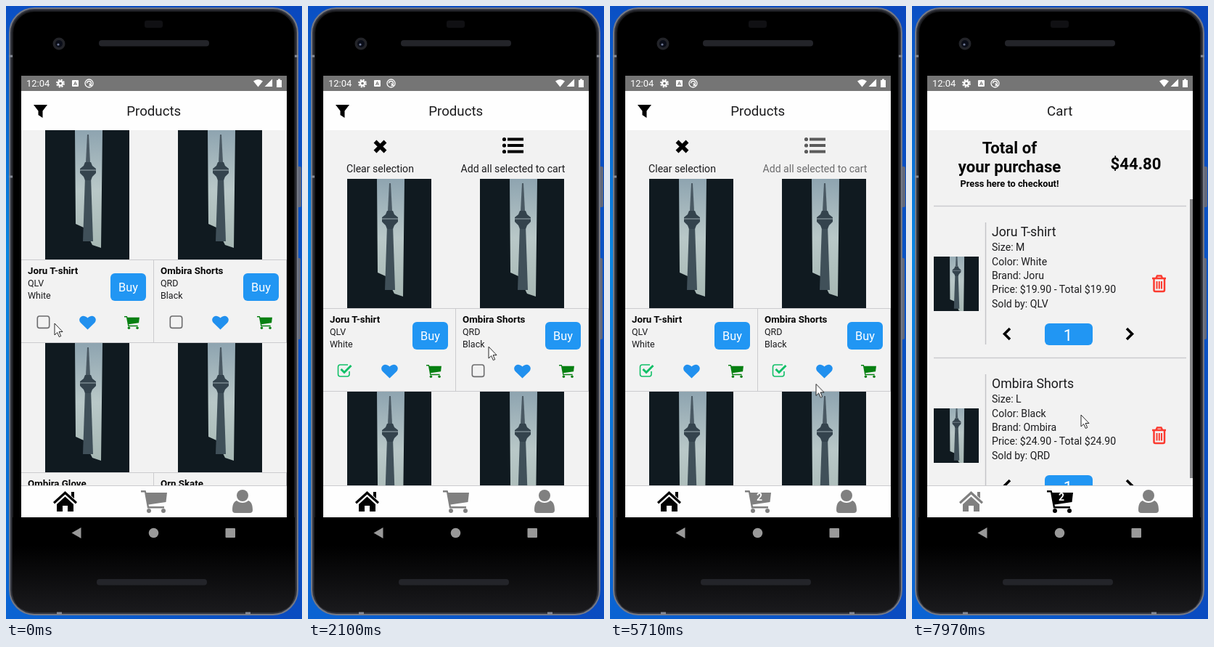
An HTML page for the animation above (8000 ms loop, 408 by 844 pixels).

```html
<!DOCTYPE html>
<html lang="en">
<head>
<meta charset="utf-8">
<title>Shop app</title>
<style>
html, body { margin: 0; width: 100%; height: 100%; overflow: hidden; background: #0a58c8; }
svg.stage { display: block; width: 100%; height: 100%; }
text { font-family: Roboto, Arial, sans-serif; fill: #1c1c1e; }
.mid { text-anchor: middle; }
.title { font-size: 18.7px; }
.name { font-size: 13.3px; font-weight: 700; fill: #050505; }
.small { font-size: 12.5px; }
.body { font-size: 14.1px; }
.item { font-size: 17.7px; }
.big { font-size: 22.2px; font-weight: 700; fill: #050505; }
.note { font-size: 12.8px; font-weight: 700; fill: #050505; }
.badge { font-size: 14px; font-weight: 700; fill: #fff; }
.white { fill: #fff; }
.rule { stroke: #cbcbce; fill: none; }

/* One 8 s loop: 1 % is 80 ms */
.anim { animation: 8s linear infinite; }
.step { animation: 8s step-end infinite; }
.cursor { animation-name: cursor; }
.list { animation-name: list; }
.actions { animation-name: actions; }
.box1 { animation-name: box1; }
.check1 { animation-name: check1; }
.box2 { animation-name: box2; }
.check2 { animation-name: check2; }
.add { animation-name: add; }
.count { animation-name: count; }
.shop { animation-name: shop; }
.basket { animation-name: basket; }
.home { animation-name: home; }
.cartTab { animation-name: cartTab; }

@keyframes cursor {
  0%, 1.6% { transform: translate(67px, 437px); }
  6% { transform: translate(62px, 434px); }
  11.5% { transform: translate(53px, 429px); }
  14.5%, 19.6% { transform: translate(49px, 428px); }
  20.5% { transform: translate(146px, 459px); }
  23% { transform: translate(205px, 466px); }
  26.25% { transform: translate(249px, 469px); }
  29.5%, 39.5% { transform: translate(235px, 500px); }
  46% { transform: translate(245px, 400px); }
  54.5% { transform: translate(267px, 263px); }
  58.5%, 64% { transform: translate(281px, 190px); }
  71.4% { transform: translate(284px, 521px); }
  75% { transform: translate(275px, 570px); }
  81%, 89% { transform: translate(213px, 675px); }
  93% { transform: translate(216px, 650px); }
  99.6%, 100% { transform: translate(233px, 563px); }
}
@keyframes list { 0% { transform: none; } 22.5%, 100% { transform: translateY(67px); } }
@keyframes actions { 0% { opacity: 0; } 22.5%, 100% { opacity: 1; } }
@keyframes box1 { 0%, 12.8% { opacity: 1; } 14.6%, 22.5% { opacity: .2; } 22.51%, 100% { opacity: 0; } }
@keyframes check1 { 0%, 22.49% { opacity: 0; } 22.5% { opacity: .2; } 24.5%, 100% { opacity: 1; } }
@keyframes box2 { 0%, 31% { opacity: 1; } 33%, 36.9% { opacity: .2; } 36.91%, 100% { opacity: 0; } }
@keyframes check2 { 0%, 36.9% { opacity: 0; } 36.91% { opacity: .2; } 39%, 100% { opacity: 1; } }
@keyframes add { 0%, 60% { opacity: 1; } 62%, 69% { opacity: .2; } 73.5%, 100% { opacity: 1; } }
@keyframes count { 0% { opacity: 0; } 68%, 100% { opacity: 1; } }
@keyframes shop { 0% { visibility: visible; } 87.5%, 100% { visibility: hidden; } }
@keyframes basket { 0% { visibility: hidden; } 87.5%, 100% { visibility: visible; } }
@keyframes home { 0% { fill: #000; } 87.5%, 100% { fill: #808080; } }
@keyframes cartTab { 0% { fill: #808080; } 87.5%, 100% { fill: #000; } }
</style>
</head>
<body>
<svg class="stage" viewBox="0 0 408 844" preserveAspectRatio="none">
  <defs>
    <linearGradient id="desk" x2="0" y2="1">
      <stop stop-color="#0a4fc4"/><stop offset=".4" stop-color="#0a86e2"/><stop offset="1" stop-color="#0a62d2"/>
    </linearGradient>
    <linearGradient id="shade">
      <stop offset=".1" stop-color="#0a46bc" stop-opacity="0"/><stop offset=".9" stop-color="#0a46bc" stop-opacity=".8"/>
    </linearGradient>
    <linearGradient id="chin" x2="0" y2="1">
      <stop offset=".3" stop-color="#000"/><stop offset="1" stop-color="#1a1a1d"/>
    </linearGradient>
    <linearGradient id="sky" x2="0" y2="1">
      <stop stop-color="#8ea4b0"/><stop offset=".5" stop-color="#b9c8c8"/><stop offset="1" stop-color="#a7b8b4"/>
    </linearGradient>
    <clipPath id="view"><rect x="21" y="171" width="366" height="489"/></clipPath>

    <symbol id="photo" viewBox="0 0 116 178" preserveAspectRatio="xMidYMid slice">
      <rect width="116" height="178" fill="#101a20"/>
      <path d="M41 0H79L77 162 65 158 53 134 42 129Z" fill="url(#sky)"/>
      <path d="M58 6H60L62 44H56Z" fill="#4a5963"/>
      <path d="M55 64H63L66 153H52Z" fill="#405059"/>
      <path d="M55 44H63L65 49 70 53V59L65 64 63 69H55L53 64 48 59V53L53 49Z" fill="#34434d"/>
      <path d="M48 55H70" stroke="#7a8991" stroke-width="1.5"/>
    </symbol>
    <symbol id="trolley" viewBox="0 0 36 31">
      <path d="M0 0H6.5L7.500 3H36L34.500 16 10.500 19.500 11 22H32V24.500H9L5 2.500H0Z"/>
      <circle cx="11" cy="28" r="3"/><circle cx="31" cy="28" r="3"/>
    </symbol>
    <g id="buy">
      <rect x="144" y="368" width="49" height="38" rx="6" fill="#2196f3"/>
      <text class="mid white" x="168.5" y="393.3" font-size="16.3">Buy</text>
    </g>
    <path id="heart" d="M11.5 19L1.7 9.5C-3 4 4-4 11.5 3 19-4 26 4 21.3 9.5Z" fill="#2190ee"/>
    <rect id="box" x="43.3" y="427" width="16.4" height="16.4" rx="3" fill="none" stroke="#6c6c6e" stroke-width="1.6"/>
    <g id="check" fill="none" stroke="#12c068">
      <path d="M57 436V440Q57 443 54 443H44.500Q41.500 443 41.500 440V430Q41.500 427 44.500 427H55" stroke-width="1.6"/>
      <path d="M45.500 433L50 437.500 59.500 428" stroke-width="3"/>
    </g>
    <g id="card">
      <use href="#photo" x="54" y="171" width="116" height="178"/>
      <path class="rule" d="M21 349.500H204M21 463.500H204M203.500 349V464"/>
      <use href="#buy"/>
      <use href="#heart" x="101" y="426.500"/>
      <use href="#trolley" x="163" y="427" width="21" height="18" fill="#078012"/>
    </g>
    <g id="entry">
      <path d="M101.500 298V466" stroke="#c4c4c8" stroke-width="1.500"/>
      <use href="#photo" x="30" y="345" width="62" height="75"/>
      <rect x="183" y="437" width="66" height="30" rx="6" fill="#2196f3"/>
      <text class="mid white" x="215" y="460.500" font-size="22">1</text>
      <path d="M135 444L127.500 451.500 135 459M296 444L303.500 451.500 296 459" fill="none" stroke="#050505" stroke-width="3.600"/>
      <g fill="none" stroke="#fb3b30" stroke-width="2.500">
        <path d="M331 375H350M336.500 374.500L338 371.500H343.500L345 374.500M333.500 376V391Q333.500 393 335.500 393H346Q348 393 348 391V376"/>
        <path d="M337.500 379V389.500M340.800 379V389.500M344 379V389.500" stroke-width="2"/>
      </g>
    </g>
  </defs>

  <!-- Phone -->
  <rect width="408" height="844" fill="url(#desk)"/>
  <rect width="408" height="844" fill="url(#shade)"/>
  <g fill="#62687a">
    <rect x="400" y="221" width="7" height="56" rx="2"/>
    <rect x="400" y="347" width="6" height="112" rx="2"/>
  </g>
  <rect x="5" y="3" width="397" height="835" rx="34" fill="#33353d" stroke="#757985" stroke-width="2"/>
  <rect x="9" y="7" width="389" height="827" rx="30" stroke="#1b1c20" stroke-width="2"/>
  <path d="M9 704H398V804Q398 834 368 834H39Q9 834 9 804Z" fill="url(#chin)"/>
  <path d="M4 69H9M4 235H9M398 69H403M70 836H77M330 836H337" stroke="#858994" stroke-width="3"/>
  <g fill="#232429">
    <rect x="191" y="20" width="25" height="10" rx="3" fill="#101013"/>
    <rect x="128" y="47" width="152" height="8.500" rx="4"/>
    <rect x="125" y="789" width="152" height="8.500" rx="4"/>
    <circle cx="73" cy="52" r="8.500"/>
  </g>
  <circle cx="73" cy="52" r="5" fill="#0a0d18"/><circle cx="72" cy="53" r="1.600" fill="#717b98"/>

  <!-- Screen -->
  <rect x="21" y="96" width="366" height="608" fill="#f2f2f2"/>
  <rect x="21" y="96" width="366" height="21" fill="#757575"/>
  <text class="white" x="28" y="111.300" font-size="13">12:04</text>
  <g fill="none" stroke="#fff">
    <circle cx="75" cy="106.500" r="3" stroke-width="2.400"/>
    <circle cx="75" cy="106.500" r="5" stroke-width="1.800" stroke-dasharray="2.2 1.727"/>
    <circle cx="114.500" cy="106.500" r="5.500" stroke-width="1.300"/>
    <path d="M111.500 106.500A3 3 0 1 1 114.500 109.500M114.500 106.500L118 110" stroke-width="1.300"/>
    <path d="M358 110.500L366.500 102V110.500Z" stroke-width="1.200"/>
  </g>
  <g fill="#fff">
    <rect x="91" y="102" width="9" height="9" rx="1"/>
    <path d="M341 103.500Q347.500 98.500 354 103.500L347.500 111.500ZM362 106.500L366.500 102V111H358Z"/>
    <path d="M373 102H375V100.500H378V102H380V112H373Z"/>
  </g>
  <path d="M93.500 109L95.500 104 97.500 109M94 107.500H97" fill="none" stroke="#757575"/>
  <rect x="21" y="117" width="366" height="54" fill="#fefefe"/>

  <g class="step shop">
    <path d="M38 136H57L50.500 144.500V154L44.500 150V144.500Z"/>
    <text class="mid title" x="203.700" y="151">Products</text>
    <g clip-path="url(#view)">
      <g class="step actions">
        <path d="M92.500 186.500L106.500 200.500M106.500 186.500L92.500 200.500" stroke="#000" stroke-width="5.500"/>
        <text class="mid body" x="99.500" y="229">Clear selection</text>
        <g class="anim add">
          <path d="M275 183.500H297M275 192H297M275 200.500H297" stroke="#000" stroke-width="4"/>
          <circle cx="270.500" cy="183.500" r="2.600"/><circle cx="270.500" cy="192" r="2.600"/><circle cx="270.500" cy="200.500" r="2.600"/>
          <text class="mid body" x="282.500" y="229">Add all selected to cart</text>
        </g>
      </g>
      <g class="step list">
        <use href="#card"/>
        <text class="name" x="30" y="368.500">Joru T-shirt</text>
        <text class="small" x="30" y="386">QLV</text>
        <text class="small" x="30" y="403.300">White</text>
        <use class="anim box1" href="#box"/>
        <use class="anim check1" href="#check"/>
        <g transform="translate(183)">
          <use href="#card"/>
          <text class="name" x="30" y="368.500">Ombira Shorts</text>
          <text class="small" x="30" y="386">QRD</text>
          <text class="small" x="30" y="403.300">Black</text>
          <use class="anim box2" href="#box"/>
          <use class="anim check2" href="#check"/>
        </g>
        <use href="#card" y="293"/>
        <use href="#card" x="183" y="293"/>
        <text class="name" x="30" y="661.500">Ombira Glove</text>
        <text class="name" x="213" y="661.500">Orn Skate</text>
      </g>
    </g>
  </g>

  <g class="step basket">
    <text class="mid title" x="203.700" y="151">Cart</text>
    <g clip-path="url(#view)">
      <text class="mid big" x="134.500" y="203">Total of</text>
      <text class="mid big" x="134.500" y="229.300">your purchase</text>
      <text class="mid note" x="134.500" y="249">Press here to checkout!</text>
      <text class="mid big" x="308.500" y="225.300">$44.80</text>
      <path class="rule" d="M30 275.500H378M30 484.500H378" stroke-width="1.500"/>
      <use href="#entry"/>
      <text class="item" x="110" y="317">Joru T-shirt</text>
      <g class="body">
        <text x="110" y="337.300">Size: M</text>
        <text x="110" y="356.700">Color: White</text>
        <text x="110" y="376">Brand: Joru</text>
        <text x="110" y="395.300">Price: $19.90 - Total $19.90</text>
        <text x="110" y="414.700">Sold by: QLV</text>
      </g>
      <g transform="translate(0 209)">
        <use href="#entry"/>
        <text class="item" x="110" y="317">Ombira Shorts</text>
        <g class="body">
          <text x="110" y="337.300">Size: L</text>
          <text x="110" y="356.700">Color: Black</text>
          <text x="110" y="376">Brand: Ombira</text>
          <text x="110" y="395.300">Price: $24.90 - Total $24.90</text>
          <text x="110" y="414.700">Sold by: QRD</text>
        </g>
      </g>
      <rect x="383" y="266" width="4" height="384" fill="#868688"/>
    </g>
  </g>

  <!-- Tab bar and system buttons -->
  <rect x="21" y="660" width="366" height="44" fill="#fefefe"/>
  <path class="rule" d="M21 660.500H387"/>
  <path class="step home" d="M81.500 668L98 683 96 685.500 81.500 672.500 67 685.500 65 683ZM70 686L81.500 675.500 93 686V696H85V688H78V696H70ZM90 669H94V678L90 674.500Z"/>
  <use class="step cartTab" href="#trolley" x="186" y="667" width="36" height="31"/>
  <text class="mid badge step count" x="206" y="681">2</text>
  <g fill="#808080">
    <circle cx="326" cy="674" r="8"/>
    <path d="M312 694C312 685 315 682 318 681 322 685 330 685 334 681 337 682 340 685 340 694Q340 698 336 698H316Q312 698 312 694Z"/>
  </g>
  <g fill="#999">
    <path d="M90.500 725.500L103.500 718V733Z"/>
    <circle cx="203.500" cy="725.500" r="6.800"/>
    <rect x="302.500" y="719" width="13.500" height="13" rx="1"/>
  </g>

  <g class="anim cursor">
    <path d="M0 0V16L3.700 12.500 6.300 18.500 8.700 17.500 6.100 11.500H11Z" fill="#fff" stroke="#111" stroke-width=".9"/>
  </g>
</svg>
</body>
</html>
```
